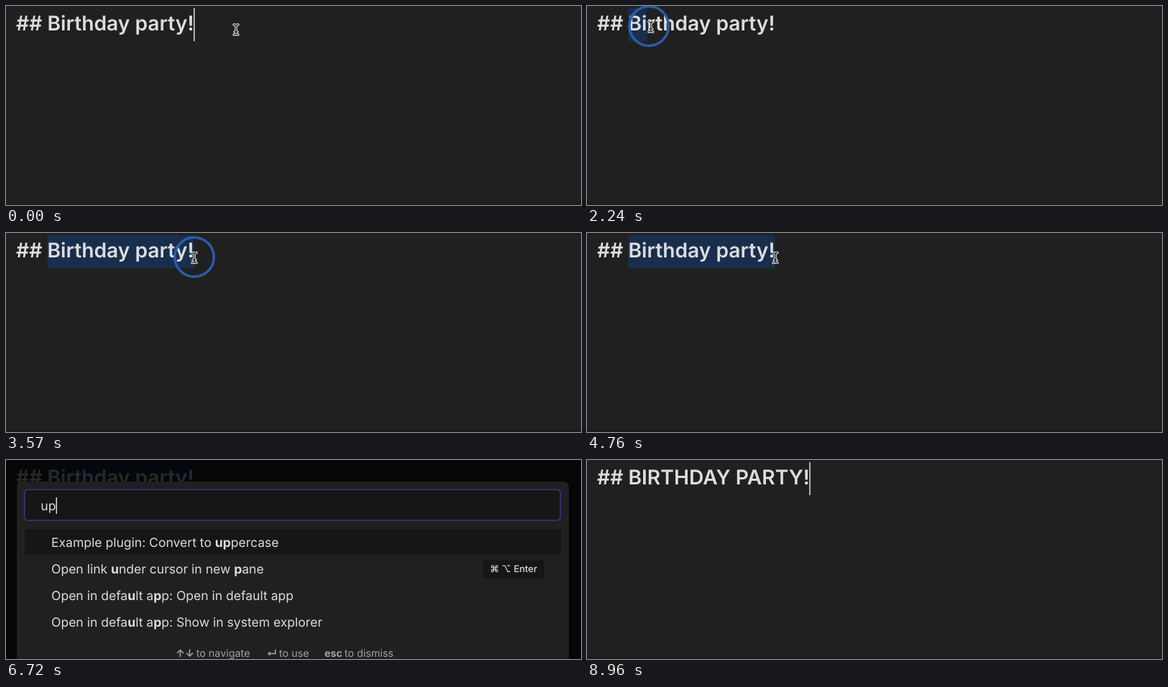
An HTML page that plays this animation: 800 by 277 pixels, repeating every 9310 ms.

```html
<!DOCTYPE html>
<html lang="en">
<head>
<meta charset="utf-8">
<style>
  html, body { margin: 0; width: 100%; height: 100%; overflow: hidden; background: #202020; }
  svg { display: block; font: 17.55px Inter, sans-serif; font-optical-sizing: none; fill: #dcddde; }
  text { white-space: pre; text-rendering: geometricPrecision; }
  #heading { font-size: 28.22px; font-weight: 600; }
  .bold { font-weight: 700; }
  .key { font-size: 13px; font-weight: 500; text-anchor: end; }
  .hint { font-size: 14.35px; fill: #a0a0a0; }
</style>
</head>
<body>
<svg width="800" height="277" viewBox="0 0 800 277">
  <rect width="800" height="277" fill="#202020"/>
  <rect y="274" width="800" height="3" fill="#1d1a1c"/>
  <rect id="selection" y="3" height="46" fill="#192e4d"/>
  <text id="heading" x="14" y="34.4"></text>
  <rect id="caret" y="3" width="1.5" height="46"/>
  <circle id="ring" fill="none" stroke="#2a5ca8" stroke-width="3.5"/>
  <g id="mouse" fill="none" stroke-linecap="round">
    <path d="M-3-7Q0-7 0-4.5Q0-7 3-7M0-5V5M-3 7Q0 7 0 4.5Q0 7 3 7M-2 3H2" stroke="#eee" stroke-width="3.4"/>
    <path d="M-3-7Q0-7 0-4.5Q0-7 3-7M0-5V5M-3 7Q0 7 0 4.5Q0 7 3 7M-2 3H2" stroke="#1c1c1c" stroke-width="1.3"/>
  </g>
  <g id="modal"></g>
</svg>
<script>
const LOOP = 9310, STEP = 70;
const PRESS = 1610, RELEASE = 3570, OPEN = 5180, CLOSE = 7840;
const LEFT = 14;
const commands = [
  ['Save current file', '⌘ S', 36],
  ['Follow link under cursor', '⌥ Enter', 69],
  ['Open link under cursor in new pane', '⌘ ⌥ Enter', 85],
  ['Toggle pin'],
  ['Split vertically'],
  ['Example plugin: Convert to uppercase'],
  ['Open in default app: Open in default app'],
  ['Open in default app: Show in system explorer'],
];
// Pointer stops: time, x, y
const stops = [[280, 320, 33], [1190, 59.3, 16.5], [1260, 59.3, 16.5], [1470, 59, 28], [1797, 59, 28], [3430, 262, 34.5]];

const $ = id => document.getElementById(id);
const set = (id, attrs) => { for (const k in attrs) $(id).setAttribute(k, attrs[k]); };
const clamp = u => Math.max(0, Math.min(1, u));
const ease = u => u < .5 ? 2 * u * u : 1 - 2 * (1 - u) ** 2;
const within = (t, a, b) => t >= a && t < b;

function pointer(t) {
  let [, x, y] = stops[0];
  for (let i = 1; i < stops.length; i++) {
    const [t0, x0, y0] = stops[i - 1], [t1, x1, y1] = stops[i];
    if (t < t0) break;
    const u = ease(clamp((t - t0) / (t1 - t0)));
    x = x0 + (x1 - x0) * u;
    y = y0 + (y1 - y0) * u;
  }
  return [x, y];
}

// Indices of the matched letters: a whole run if there is one, else scattered
function match(name, query) {
  const lower = name.toLowerCase(), run = lower.indexOf(query);
  if (run >= 0) return [...query].map((_, i) => run + i);
  const hits = [];
  for (const c of query) {
    const at = lower.indexOf(c, hits.length ? hits.at(-1) + 1 : 0);
    if (at < 0) return null;
    hits.push(at);
  }
  return hits;
}

const rect = (x, y, w, h, fill, r = 0, extra = '') =>
  `<rect x="${x}" y="${y}" width="${w}" height="${h}" rx="${r}" fill="${fill}" ${extra}/>`;
const text = (x, y, s, extra = '') => `<text x="${x}" y="${y}" ${extra}>${s}</text>`;

function modal(query, caretOn) {
  const run = c => c[0].toLowerCase().includes(query) ? 0 : 1;
  const found = commands.filter(c => match(c[0], query));
  if (query.length > 1) found.sort((a, b) => run(a) - run(b));
  const dy = query ? 1 : 0, scrolls = found.length > 4;
  const hintY = 125 + 37.2 * found.length + dy;

  let out = rect(0, 0, 800, 277, '#000', 0, 'opacity=".82"')
    + rect(15, 30, 768, hintY - 8.5, '#202020', 7)
    + rect(25.7, 41.2, 745.6, 41.8 + dy, '#161616', 5, 'stroke="#42328c" stroke-width="1.4"')
    + text(48.3, 69 + dy, query || 'Select a command...', query ? '' : 'fill="#666"')
    + rect(26, 95 + dy, scrolls ? 735 : 746, 36, '#161616');

  found.slice(0, 5).forEach(([name, key, width], i) => {
    const y = 119.7 + 37.2 * i + dy, hits = match(name, query);
    const label = [...name].map((c, j) => hits.includes(j) ? `<tspan class="bold">${c}</tspan>` : c).join('');
    out += text(63, y, label);
    if (key) out += rect(749 - width, y - 18.5, width, 25, '#161616', 4) + text(739, y - 1.9, key, 'class="key"');
  });

  if (scrolls) out += rect(761, 84, 11, 136, '#484848', 5);
  else [[236, '↑↓', 1], [264.7, 'to navigate'], [362.5, '↵', 1], [380, 'to use'], [443, 'esc', 1], [471, 'to dismiss']]
    .forEach(([x, s, bold]) => out += text(x, hintY - .6, s, `class="hint${bold ? ' bold' : ''}"`));

  if (caretOn) out += rect(48 + (query ? 10.4 * query.length + .7 : 0), 51 + dy, 1.5, 23, '#dcddde');
  return out;
}

function draw(t) {
  const title = t < CLOSE ? '## Birthday party!' : '## BIRTHDAY PARTY!';
  const heading = $('heading');
  heading.textContent = title;
  const edge = n => LEFT + heading.getSubStringLength(0, n);
  const [x, y] = pointer(t);

  // The selection snaps to the letter boundary nearest the pointer
  let end = 3;
  while (end < title.length && (edge(end) + edge(end + 1)) / 2 < x) end++;
  const selecting = within(t, PRESS, CLOSE);
  set('selection', { x: edge(3), width: selecting ? edge(end) - edge(3) : 0 });

  const caretOff = selecting || within(t, 630, 1120) || within(t, 8400, 8960);
  set('caret', { x: edge(title.length) - .5, opacity: caretOff ? 0 : 1 });
  set('mouse', { transform: `translate(${x} ${y})`, opacity: t < OPEN ? 1 : 0 });

  const [rx, ry] = pointer(t - 20);
  const grown = clamp((t - PRESS + STEP) / 210), gone = clamp((t - RELEASE) / 490);
  set('ring', {
    cx: rx, cy: ry - 1,
    r: 27.3 + 12 * ease(gone),
    opacity: t < PRESS ? 0 : grown * (1 - gone),
  });

  const query = 'upp'.slice(0, t < 6440 ? 0 : t < 6650 ? 1 : t < 6860 ? 2 : 3);
  const caretOn = !within(t, 5670, 6160) && t < 7350;
  $('modal').innerHTML = within(t, OPEN, CLOSE) ? modal(query, caretOn) : '';
}

const start = performance.now();
let last = -1;
function tick() {
  const now = (performance.now() - start) % LOOP;
  const t = Math.floor(now / STEP) * STEP;
  if (t !== last) draw(last = t);
  requestAnimationFrame(tick);
}
tick();
</script>
</body>
</html>
```
